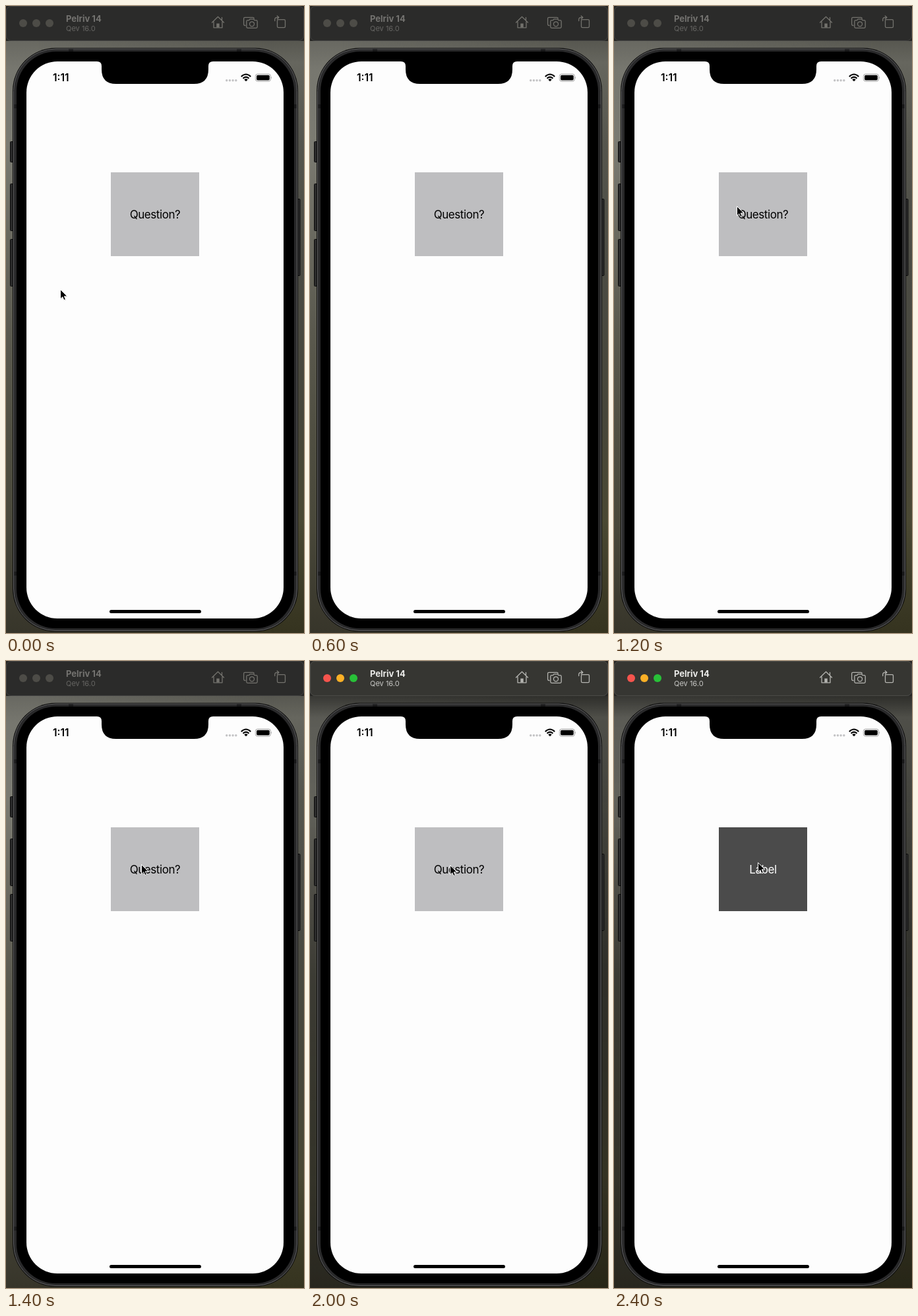
Animation, 452 px wide and 950 px high, one loop 2600 ms. Source, as an HTML page:

```html
<!DOCTYPE html>
<html lang="en">
<head>
<meta charset="utf-8">
<title>Tap to reveal</title>
<style>
html, body { margin: 0; width: 100%; height: 100%; overflow: hidden; }
body { position: relative; background: #3a3930; }
.wall, svg { position: absolute; left: 0; top: 0; width: 452px; height: 950px; }
.wall.right { background: linear-gradient(#55554e 5%, #66665e 9%, #55554d 22%, #4a4a42 45%, #47463a 65%, #4a4833 82%, #35331f 100%); }
.wall.left {
  background: linear-gradient(#66665f 5%, #77776f 10%, #7b7b72 22%, #69685e 38%, #5a594e 52%, #504f42 68%, #49483a 83%, #37352a 100%);
  -webkit-mask-image: linear-gradient(90deg, #000 10%, transparent 90%);
  mask-image: linear-gradient(90deg, #000 10%, transparent 90%);
}
.wall.shade { background: linear-gradient(rgba(0,0,0,.5) 5%, rgba(0,0,0,.22) 9%, rgba(0,0,0,.2) 24%, rgba(0,0,0,.34) 50%, rgba(0,0,0,.26)); }

text { font-family: Inter, Roboto, sans-serif; }
.label { font-size: 17px; letter-spacing: -.43px; text-anchor: middle; }

/* Every change is a hard cut */
.focus, .answer, .cursor { animation: 2600ms step-end infinite; }
.focus { opacity: 0; animation-name: focus; }
.answer { opacity: 0; animation-name: answer; }
.cursor { animation-name: cursor; }

@keyframes focus { 0% { opacity: 0; } 76.92%, 100% { opacity: 1; } }
@keyframes answer { 0% { opacity: 0; } 84.61%, 100% { opacity: 1; } }
@keyframes cursor {
  0%     { transform: translate(82px, 429px); opacity: 1; }
  7.69%  { transform: translate(82px, 429px); opacity: 0; }
  30.76% { transform: translate(108px, 304px); opacity: 1; }
  38.46% { transform: translate(152px, 302px); opacity: 1; }
  46.15% { transform: translate(186px, 303px); opacity: 1; }
  53.84% { transform: translate(205px, 308px); opacity: 1; }
  61.53% { transform: translate(212px, 309px); opacity: 1; }
  84.61% { transform: translate(214px, 307px); opacity: 1; }
  92.3%, 100% { transform: translate(218px, 305px); opacity: 1; }
}
</style>
</head>
<body>
<div class="wall right"></div>
<div class="wall left"></div>
<div class="wall shade focus"></div>

<svg viewBox="0 0 452 950">
  <defs>
    <g id="tools" fill="none" stroke-width="1.3" stroke-linejoin="round" stroke-linecap="round">
      <path d="M312.5 25 321.5 16.3 330.5 25M315 23.5V32.8H328V23.5M327.5 21.5V17.3"/>
      <path d="M319.3 32.5V26.5H323.7V32.5Z" fill="currentColor" stroke="none"/>
      <path d="M363 29.5H362.3Q360.6 29.5 360.6 27.8V19Q360.6 17.3 362.3 17.3H374.5Q376.2 17.3 376.2 19"/>
      <path d="M366.6 21.7H368.6L370 19.9H375.6L377 21.7H379.4Q381.2 21.7 381.2 23.5V31.5Q381.2 33.3 379.4 33.3H366.6Q364.8 33.3 364.8 31.5V23.5Q364.8 21.7 366.6 21.7Z"/>
      <circle cx="373" cy="27.3" r="3.5"/>
      <rect x="411.5" y="20.7" width="12" height="12" rx="1.6"/>
      <path d="M407.7 22.5V20.5Q407.7 17.3 411 17.3H413.5M411.3 14.9 413.9 17.3 411.3 19.7"/>
    </g>
    <g id="titles">
      <text x="91" y="24" font-size="13" font-weight="700">Pelriv 14</text>
      <text x="91" y="38" font-size="11" opacity=".8">Qev 16.0</text>
    </g>
  </defs>

  <!-- Window bar -->
  <rect y="-1" width="452" height="54" fill="#252523"/>
  <rect x=".5" y=".5" width="451" height="52" rx="7" fill="#2b2b2a" stroke="#414140"/>
  <g fill="#4d4c47">
    <circle cx="26" cy="26" r="6"/><circle cx="46" cy="26" r="6"/><circle cx="66" cy="26" r="6"/>
  </g>
  <use href="#titles" fill="#747370"/>
  <use href="#tools" stroke="#73726d" color="#73726d"/>
  <g class="focus">
    <rect x=".5" y=".5" width="451" height="52" rx="7" fill="#363632" stroke="#4b4b47"/>
    <circle cx="26" cy="26" r="6" fill="#f6544d"/>
    <circle cx="46" cy="26" r="6" fill="#fbb026"/>
    <circle cx="66" cy="26" r="6" fill="#28c038"/>
    <use href="#titles" fill="#ececea"/>
    <use href="#tools" stroke="#b4b4b0" color="#b4b4b0"/>
  </g>

  <!-- Side buttons -->
  <g fill="#2a2a2a" stroke="#0c0c0c">
    <rect x="6.5" y="205.5" width="6" height="31" rx="1"/>
    <rect x="6.5" y="269.5" width="6" height="71" rx="1"/>
    <rect x="6.5" y="353.5" width="6" height="71" rx="1"/>
    <rect x="440" y="292.5" width="6" height="116" rx="1"/>
  </g>

  <!-- Body -->
  <rect x="10" y="63.5" width="433" height="884.5" rx="65" fill="#0b0b0b"/>
  <rect x="11.5" y="65" width="430" height="881.5" rx="63.5" fill="#29292a" stroke="#626263"/>
  <g fill="#1a1a1b">
    <path d="M12 149H16V155H12ZM437 149H441V155H437ZM12 857H16V863H12ZM437 857H441V863H437ZM95 65.5H102V69H95ZM350 65.5H357V69H350Z"/>
  </g>
  <rect x="16" y="69" width="421" height="874" rx="60"/>
  <rect x="31" y="84" width="390" height="844" rx="47" fill="#fdfdfd"/>
  <path d="M138 83.5V84Q145 84 145 91V96Q145 118 167 118H285Q307 118 307 96V91Q307 84 314 84V83.5Z"/>

  <!-- Status bar -->
  <text x="83.3" y="114" font-size="15.5" font-weight="600" text-anchor="middle">1:11</text>
  <g fill="#c3c3c5">
    <circle cx="334.7" cy="112.7" r="1.7"/><circle cx="339.4" cy="112.7" r="1.7"/>
    <circle cx="344.1" cy="112.7" r="1.7"/><circle cx="348.8" cy="112.7" r="1.7"/>
  </g>
  <g fill="none" stroke="#000" stroke-width="2.1">
    <path d="M356.8 106.9Q364 100.1 371.2 106.9M359.5 109.7Q364 105.5 368.5 109.7"/>
  </g>
  <path d="M361.3 111.5Q364 109.2 366.7 111.5L364 114.2Z"/>
  <rect x="378.4" y="103.1" width="23" height="11" rx="3.2" fill="none" stroke="#a3a3a3"/>
  <rect x="380" y="104.7" width="19.8" height="7.8" rx="1.8"/>
  <path d="M402.4 106.8Q404 108.6 402.4 110.4Z" fill="#a3a3a3"/>

  <!-- Card -->
  <rect x="159" y="252" width="134" height="127" fill="#bebec0"/>
  <text class="label" x="226" y="321.5">Question?</text>
  <g class="answer">
    <rect x="159" y="252" width="134" height="127" fill="#4b4b4b"/>
    <text class="label" x="226" y="321.5" fill="#fff">Label</text>
  </g>

  <rect x="157" y="915" width="139" height="5" rx="2.5"/>

  <g class="cursor">
    <path d="M1 1.2V15.8L4.4 12.6 6.5 17.4 8.9 16.4 6.9 11.8H11.4Z" fill="#000" opacity=".18"/>
    <path d="M.5 .5V14.8L3.8 11.8 5.9 16.6 8.4 15.5 6.3 10.9H10.9Z" stroke="#fff" stroke-width="1"/>
  </g>
</svg>
</body>
</html>
```
